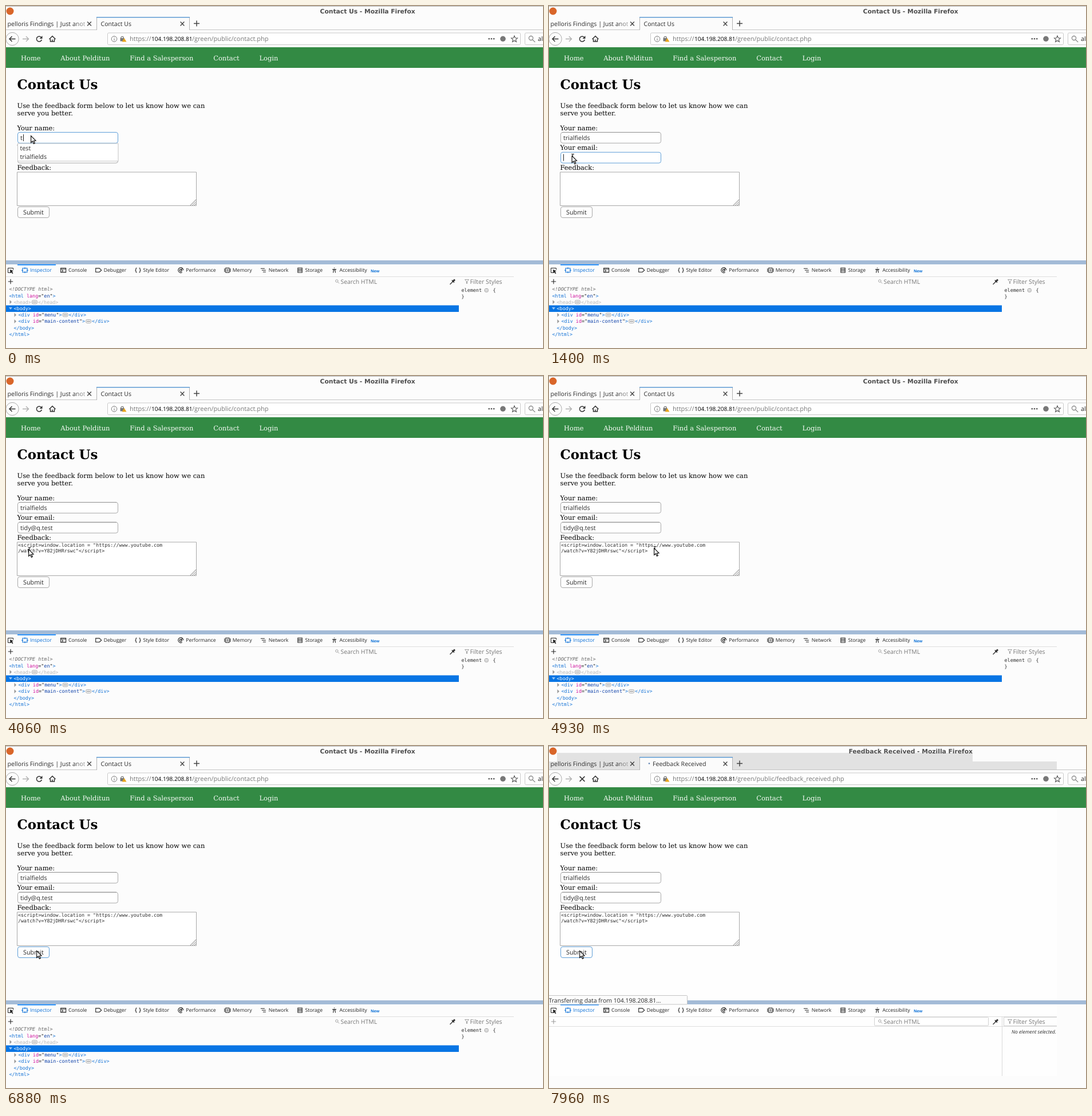
Write an HTML page with a canvas that moves like this. It is 938 by 597 pixels and loops after 8 s.

```html
<!DOCTYPE html>
<html lang="en">
<head>
<meta charset="utf-8">
<title>Contact form</title>
<style>
html, body { margin: 0; width: 100%; height: 100%; overflow: hidden; background: #fcfcfc; }
canvas { display: block; }
</style>
</head>
<body>
<canvas id="stage" width="938" height="597"></canvas>
<script>
const ctx = document.getElementById('stage').getContext('2d');
ctx.textRendering = 'geometricPrecision';
const LOOP = 8000;
const UI = '"Open Sans", "Noto Sans", sans-serif';
const SERIF = '"DejaVu Serif", serif';
const MONO = '"DejaVu Sans Mono", monospace';
const INK = '#2c2c2c', GREY = '#777', EDGE = '#a9a9a9', SEL = '#9bb7d5', FOCUS = '#5f9fd8';
const EM = 11.46, COL = 5.06, ROW = 10;
const NAME = 'trialfields', MAIL = 'tidy@q.test';
const LINES = ['<script>window.location = "https://www.youtube.com', '/watch?v=Y82jDHRrswc"</' + 'script>'];
const LENGTH = LINES.join('').length;

// When things happen, in ms
const WHEN = {
  hoverName: 420, pickName: 690, focusMail: 1400, typeMail: 2400, hoverMail: 2970, pickMail: 3100,
  focusText: 3240, paste: 4060, dragStart: 5050, dragEnd: 5710, submit: 6730, load: 7560, arrive: 7840
};

// Pointer glides: leave, arrive, x, y
const GLIDES = [
  [0, 0, 43, 226], [150, 270, 42, 250], [420, 540, 39.5, 261], [2650, 2900, 40, 281],
  [3060, 3130, 39, 302], [4350, 4630, 168, 296], [4630, 4930, 183, 300], [5050, 5290, 108, 302],
  [5290, 5710, 25, 294], [5760, 6100, 186, 311], [6240, 6730, 53, 357]
];

function pointerAt(t) {
  let x = 0, y = 0;
  for (const [leave, arrive, toX, toY] of GLIDES) {
    if (t < leave) break;
    const u = Math.min(1, (t - leave) / (arrive - leave || 1));
    const k = arrive ? u * u * (3 - 2 * u) : 1;
    x += (toX - x) * k;
    y += (toY - y) * k;
  }
  return { x, y };
}

// First selected character, following the drag
function selectionStart(t) {
  if (t < WHEN.dragStart || t >= WHEN.submit) return LENGTH;
  const p = pointerAt(Math.min(t, WHEN.dragEnd));
  const before = p.y >= 300 ? LINES[0].length : 0;
  return Math.min(LENGTH, before + Math.round((p.x - 21) / COL));
}

function text(s, x, y, size, color = INK, family = UI, style = '') {
  ctx.font = `${style} ${size}px ${family}`;
  ctx.fillStyle = color;
  ctx.fillText(s, x, y);
  return x + ctx.measureText(s).width;
}
function rect(x, y, w, h, color) {
  ctx.fillStyle = color;
  ctx.fillRect(x, y, w, h);
}
function box(x, y, w, h, r, stroke, fill) {
  ctx.beginPath();
  ctx.roundRect(x, y, w, h, r);
  if (fill) { ctx.fillStyle = fill; ctx.fill(); }
  ctx.strokeStyle = stroke;
  ctx.lineWidth = 1;
  ctx.stroke();
}
function dot(x, y, r, color) {
  ctx.beginPath();
  ctx.arc(x, y, r, 0, 7);
  ctx.fillStyle = color;
  ctx.fill();
}
// Path drawn around (x, y); a width of 0 fills it
function icon(x, y, d, color = '#333', width = 1) {
  const path = new Path2D(d);
  ctx.save();
  ctx.translate(x, y);
  ctx.fillStyle = ctx.strokeStyle = color;
  ctx.lineWidth = width;
  if (width) ctx.stroke(path);
  else ctx.fill(path);
  ctx.restore();
}
function clipped(x, y, w, h, paint) {
  ctx.save();
  ctx.beginPath();
  ctx.rect(x, y, w, h);
  ctx.clip();
  paint();
  ctx.restore();
}
const ring = r => `M${r} 0A${r} ${r} 0 1 1 ${-r} 0A${r} ${r} 0 1 1 ${r} 0`;
const cross = r => `M${-r} ${-r}L${r} ${r}M${-r} ${r}L${r} ${-r}`;
const plus = r => `M${-r} 0H${r}M0 ${-r}V${r}`;
const lens = r => `${ring(r)}M${r * .7} ${r * .7}L${r * 2} ${r * 2}`;
function star(r) {
  const points = Array.from({ length: 10 }, (_, i) => {
    const a = (i / 5 - .5) * Math.PI, d = i % 2 ? r * .45 : r;
    return `${d * Math.cos(a)} ${d * Math.sin(a)}`;
  });
  return 'M' + points.join('L') + 'Z';
}

function tabs(t, loading, page) {
  if (loading) {
    rect(0, 27, 158, 14, '#e2e2e2');
    rect(321, 27, 566, 14, '#e2e2e2');
  }
  rect(0, 41, 938, 1, '#c4c4c4');
  rect(158, 20, 163, 22, '#b4b4b4');
  rect(159, 20, 161, 22, '#fbfbfb');
  rect(158, 19, 163, 1.5, '#5e9bd3');
  const fade = ctx.createLinearGradient(118, 0, 140, 0);
  fade.addColorStop(0, INK);
  fade.addColorStop(1, '#bbb');
  clipped(0, 20, 138, 20, () => text('pelloris Findings | Just another', 2.5, 34.5, 10.7, fade));
  for (const x of [145.5, 308]) icon(x, 31, cross(3.4), '#444', 1.4);
  icon(333, 30.5, plus(5), '#444', 1.5);
  text(page, loading ? 181 : 165.5, 34.5, 10.6);
  if (loading) dot(167 + 8 * Math.min(1, (t - WHEN.load) / 300), 30.5, 1.3, '#5b7fae');
}

function addressBar(arrived) {
  const arrow = 'M5.5 0H-5M-.5 -4.5L-5 0L-.5 4.5';
  icon(11, 57.5, ring(11.2), '#aaa');
  icon(11, 57.5, arrow, '#333', 1.5);
  icon(34, 57.5, 'M-5 0H5.5M1 -4.5L5.5 0L1 4.5', '#b0b0b0', 1.4);
  if (arrived) icon(58, 57.5, cross(4.4), '#333', 1.5);
  else {
    icon(58, 57.5, 'M4.4 1.3A4.6 4.6 0 1 1 3.3 -3.2', '#333', 1.5);
    icon(58, 57.5, 'M5.5 -5.5V-.5H.5Z', '#333', 0);
  }
  icon(81, 57.5, 'M-5.5 .5L0 -5L5.5 .5M-3.5 0V4.5H3.5V0M0 4.5V1', '#333', 1.5);

  box(177.5, 47, 721, 20.5, 2, '#c9c9c9', '#fff');
  icon(189, 57.5, ring(4.8) + 'M0 -.8V2.8M0 -3V-2', GREY);
  icon(203, 56, 'M-2.4 0A2.4 2.6 0 0 1 2.4 0', GREY, 1.2);
  rect(199.5, 56, 7, 5.5, GREY);
  icon(206.5, 56, 'M0 0L4 6.5H-4Z', '#e8a51c', 0);
  text('https://', 216, 61, 11, GREY);
  text('104.198.208.81', 254, 61, 10.1, '#000');
  text(`/green/public/${arrived ? 'feedback_received' : 'contact'}.php`, 325, 61, 11, GREY);
  for (let i = -1; i < 2; i++) dot(848 + i * 4.2, 57.3, 1.3, '#555');
  dot(868, 57.3, 4.8, GREY);
  icon(888, 57.8, star(5.8), '#555', 1.1);
  box(906.5, 47, 50, 20.5, 2, '#c9c9c9', '#fff');
  icon(917, 56, lens(3.6), GREY, 1.1);
  text('al', 929, 61, 10.7, '#222');
}

function browser(t, loading, arrived) {
  const page = arrived ? 'Feedback Received' : 'Contact Us';
  rect(0, 0, 938, 1, '#b5b5b5');
  if (arrived) rect(14, 12, 726, 15, '#e2e2e2');
  dot(7, 9, 6.5, '#d9662a');
  ctx.textAlign = 'center';
  text(page + ' - Mozilla Firefox', 631.7, 13, 10.72, '#4c4c4c', '"DejaVu Sans", sans-serif', 'bold');
  ctx.textAlign = 'left';
  tabs(t, loading, page);
  addressBar(arrived);
}

const caret = (x, y, h = 12) => rect(x, y, 1, h, '#222');

function field(y, value, focused) {
  box(20.5, y + .5, 175, 18.8, 3.5, focused ? FOCUS : EDGE, '#fff');
  if (!focused) rect(23, y, 170, 1, '#8f8f8f');
  text(value, 25, y + 14, 10.8);
}

function options(y, rows, picked) {
  const step = 14.4;
  box(20.5, y + .5, 175.5, rows.length * step + 2, 0, '#c4c4c4', '#fff');
  rows.forEach((s, i) => {
    const hot = i === picked, top = y + 1.5 + i * step;
    if (hot) rect(21, top, 174, step, SEL);
    text(s, 24.5, top + 11.3, 10.8, hot ? '#fff' : INK);
  });
}

function feedback(t) {
  box(19.5, 290, 313, 58.5, 0, EDGE, '#fff');
  for (let d = 10; d > 2; d -= 3.5) icon(332, 348, `M${-d} 0L0 ${-d}`, GREY);
  if (t >= WHEN.focusText && t < WHEN.paste) caret(21.5, 291, 9);
  if (t < WHEN.paste) return;
  let start = selectionStart(t);
  LINES.forEach((s, i) => {
    const first = Math.max(0, Math.min(s.length, start));
    const top = 290.5 + i * ROW, x = 21 + first * COL;
    text(s.slice(0, first), 21, top + 7.7, 8.4, INK, MONO);
    if (first < s.length) {
      rect(x, top, (s.length - first) * COL, ROW, SEL);
      text(s.slice(first), x, top + 7.7, 8.4, '#fff', MONO);
    }
    start -= s.length;
  });
}

function page(t) {
  rect(0, 72, 938, 36, '#338a44');
  let x = 26;
  for (const s of ['Home', 'About Pelditun', 'Find a Salesperson', 'Contact', 'Login']) {
    x = text(s, x, 95, EM, '#f6fbf6', SERIF) + 34.8;
  }
  text('Contact Us', 19.5, 145, EM * 2, '#000', SERIF, 'bold');
  const body = (s, y) => text(s, 19.5, y, EM, '#000', SERIF);
  body('Use the feedback form below to let us know how we can', 177.5);
  body('serve you better.', 191.3);
  ['Your name:', 'Your email:', 'Feedback:'].forEach((s, i) => body(s, 216.5 + i * 34.6));

  const naming = t < WHEN.pickName, mailing = t >= WHEN.typeMail && t < WHEN.pickMail;
  field(220, naming ? 't' : NAME, t < WHEN.focusMail);
  field(254.8, mailing ? 't' : t < WHEN.pickMail ? '' : MAIL, t >= WHEN.focusMail && t < WHEN.focusText);
  if (naming) {
    caret(30, 224);
    options(239.5, ['test', NAME], t < WHEN.hoverName ? -1 : 1);
  }
  if (t >= WHEN.focusMail && t < WHEN.typeMail) caret(25, 258.5);
  feedback(t);
  if (mailing) options(274.5, [MAIL], t < WHEN.hoverMail ? -1 : 0);
  box(20.5, 350.5, 55, 19, 3.5, t < WHEN.submit ? EDGE : FOCUS, '#fdfdfd');
  text('Submit', 30, 364, 10.8);
}

// Each tool's icon is drawn around its centre
const TOOLS = [
  ['Inspector', 'M-4 -3.5H4V3.5H-4ZM-6 0H-3M3 0H6M0 -5V-2M0 2V5'],
  ['Console', 'M-4.5 -3.7H4.5V3.7H-4.5ZM-4.5 -2H4.5M-2.5 -.5L-.5 1L-2.5 2.5'],
  ['Debugger', 'M-5 -3.3H1.5L5 0L1.5 3.3H-5Z'],
  ['Style Editor', 'M-2 -4Q-4 -4 -3.5 -1.5L-4.5 0L-3.5 1.5Q-4 4 -2 4M2 -4Q4 -4 3.5 -1.5L4.5 0L3.5 1.5Q4 4 2 4'],
  ['Performance', 'M2.5 3.7A4.5 4.5 0 1 1 4.5 0M0 0L3.5 -3.5' + ring(2)],
  ['Memory', 'M-3 -4H3V4H-3ZM-5 -3V3M5 -3V3M0 -2.5V2.5'],
  ['Network', 'M-5 -3H2M-3 0H4M-1 3H4'],
  ['Storage', 'M-3.7 -4H3.7V4H-3.7ZM-3.7 -1.3H3.7M-3.7 1.3H3.7'],
  ['Accessibility', 'M-.7 -4H.7M-3.5 -1.3H3.5M-2 4.5L-1 -1H1L2 4.5']
];

function toolbar() {
  const blue = '#0a6fd6';
  rect(0, 444, 938, 7, '#a3bbd7');
  rect(0, 472, 887, 1, '#dedede');
  rect(20, 451, 67, 1.6, '#0a84ff');
  icon(8, 461.5, 'M1 4H-4.5V-4H4.5V-1', '#222');
  icon(8, 461.5, 'M-1 -1.5L5 1L2.5 2L4.5 5L3 6L1.3 3.3L-.5 4.5Z', '#222', 0);
  let x = 42;
  TOOLS.forEach(([name, shape], i) => {
    const color = i ? '#222' : blue;
    icon(x - 9, 461.2, shape, color, 1.1);
    x = text(name, x, 464.3, 8.65, color) + 29.3;
  });
  text('New', 637, 464.5, 6.8, blue, UI, 'bold');
}

function searches(loading) {
  if (loading) {
    rect(0, 489, 887, 1, '#dedede');
    rect(791, 472, 1, 104, '#dadada');
    box(568.5, 473.5, 199, 14.5, 1, '#d2d2d2', '#fff');
    icon(794.5, 473.5, 'M92.5 0H0V15H92.5', '#d2d2d2');
  }
  icon(8, 481, plus(4.2), loading ? '#999' : '#222', 1.1);
  icon(577.8, 480, lens(2.2), '#999', .9);
  text('Search HTML', 584.5, 484.5, 10.4, GREY);
  icon(780, 481.5, 'M-4.5 4.5L1 -1M-1.2 -3L3 1.2', '#333', 1.3);
  icon(780, 481.5, 'M0 0L4 -4', '#333', 3);
  icon(805, 481, 'M-3.5 -3.5H3.5L.5 0V3.5H-.5V0Z', '#999', .9);
  text('Filter Styles', 810.5, 484.5, 10.6, GREY);
}

function badge(x, y) {
  box(x + 1.5, y - 6, 9, 6, 2, '#aaa', '#f3f3f3');
  for (let i = 0; i < 3; i++) dot(x + 4 + i * 2, y - 3, .6, '#333');
  return x + 12;
}

function markup() {
  const blue = '#1372d6', open = 'M-3 -2H3L0 2Z', shut = 'M-1.5 -3.5L2 0L-1.5 3.5Z';
  const row = i => 497.4 + i * 11.2;
  const code = (s, x, y, color = blue, style) => text(s, x, y, 8.43, color, MONO, style);
  const tag = (name, key, value, x, y) => [
    [`<${name} `], [key, '#d0129f'], ['="', '#222'], [value, '#0b3fa8'], ['"', '#222'], ['>']
  ].reduce((at, [s, color]) => code(s, at, y, color), x);

  code('<!DOCTYPE html>', 5.5, row(0), '#666', 'italic');
  tag('html', 'lang', 'en', 5.5, row(1));
  icon(8, row(2) - 3, shut, '#999', 0);
  code('</head>', badge(code('<head>', 13.5, row(2), '#b9b9b9'), row(2)), row(2), '#b9b9b9');
  rect(0, 522.5, 791, 11.5, '#0875e4');
  icon(8, row(3) - 3, open, '#9cc8f5', 0);
  code('<body>', 13.5, row(3), '#fff');
  ['menu', 'main-content'].forEach((id, i) => {
    const y = row(4 + i);
    icon(16, y - 3, shut, '#999', 0);
    code('</div>', badge(tag('div', 'id', id, 21.5, y), y), y);
  });
  code('</body>', 13.5, row(6));
  code('</html>', 5.5, row(7));

  code('element', 795.5, 499.3, INK);
  box(836.5, 493.5, 5.5, 5.5, 1, '#999');
  icon(839.2, 496.2, plus(4), '#bbb', .7);
  code('{', 850.5, 499.3, INK);
  code('}', 795.5, 510, INK);
}

function pointer(t) {
  const { x, y } = pointerAt(t);
  const inMail = t >= WHEN.pickName && y > 255 && y < 274;
  const inText = t >= WHEN.pickMail && y > 290 && y < 348;
  if (inMail || inText) icon(x + 2, y, 'M-2.5 -2.5H2.5M0 -2.5V9', '#222', 1.1);
  const arrow = 'M.6 .6V12.4L3.4 10L5.4 14.4L7.3 13.5L5.4 9.3L9 9Z';
  icon(x, y, arrow, '#fff', 0);
  icon(x, y, arrow, '#111', 1.2);
}

function draw(t) {
  const loading = t >= WHEN.load, arrived = t >= WHEN.arrive;
  rect(0, 0, 938, 597, '#fcfcfc');
  if (loading) rect(0, 108, 887, 468, '#fefefe');
  browser(t, loading, arrived);
  page(t);
  toolbar();
  searches(loading);
  if (loading) clipped(792, 490, 95, 20, () => text('No element selected.', 808, 502, 8.6, INK, UI, 'italic'));
  else markup();
  if (arrived) {
    box(-2, 435.5, 243.5, 15.5, 1, '#c4c4c4', '#fcfcfc');
    text('Transferring data from 104.198.208.81…', -.5, 447.5, 10.5);
  }
  pointer(t);
}

const begin = performance.now();
function tick() {
  draw((performance.now() - begin) % LOOP);
  requestAnimationFrame(tick);
}
tick();
</script>
</body>
</html>
```
